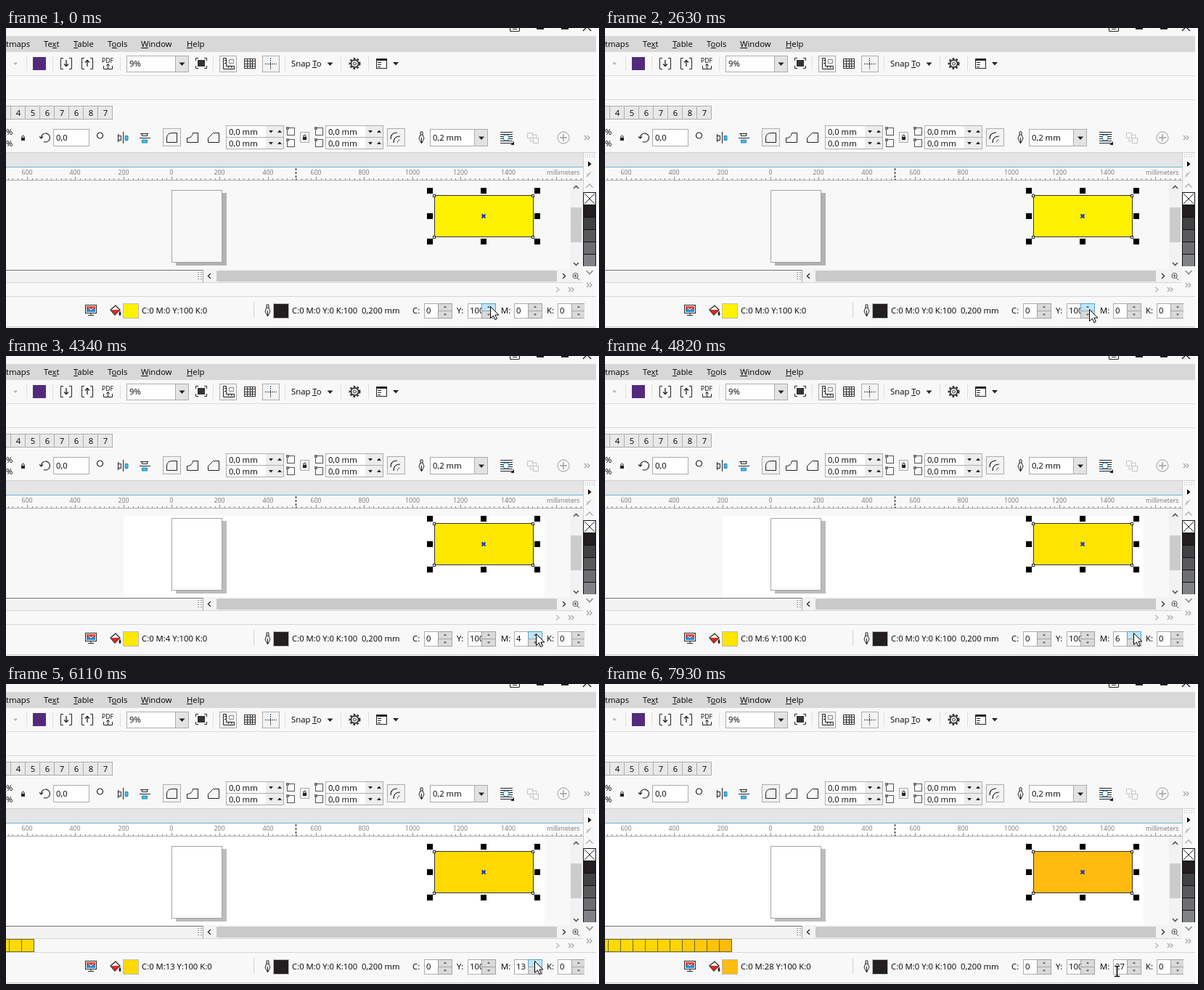
These frames come from a looping animation (817 by 413 pixels, 8000 ms). An HTML page with a canvas:

```html
<!DOCTYPE html>
<html lang="en">
<head>
<meta charset="utf-8">
<title>Colour spinner</title>
<style>
html, body { margin: 0; width: 817px; height: 413px; overflow: hidden; background: #f8f8f8; }
canvas { display: block; }
</style>
</head>
<body>
<canvas id="stage" width="817" height="413"></canvas>
<script>
const g = document.getElementById('stage').getContext('2d');
const INK = '#222', EDGE = '#adadad', DIM = '#b4b4b4', BG = '#f8f8f8', BLUE = '#1883c4';

// time and magenta value set at that time
const clicks = [[0, 0], [3840, 1], [3960, 2], [4100, 3], [4340, 4], [4580, 5], [4820, 6],
  [5060, 7], [5210, 8], [5340, 9], [5480, 10], [5620, 11], [5860, 12], [6110, 13],
  [6250, 14], [6390, 15], [6630, 16], [6780, 17], [7570, 20], [7690, 22], [7810, 25], [7930, 28]];
// time, pointer tip
const moves = [[0, 667, 383], [2630, 667, 387], [2780, 700, 386], [3030, 718, 380],
  [3180, 724, 387], [3330, 725, 387], [3480, 730, 382], [4820, 728, 381], [6900, 713, 381]];
const presses = [870, 990, 1130, 1280, 1530, 1810, 1950, 2070];
const stops = [[0, 255, 242, 0], [4, 255, 232, 0], [9, 255, 222, 0], [17, 255, 212, 0], [28, 255, 187, 14]];

const at = (list, t) => list.filter(e => e[0] <= t).pop();

function tint(m) {
  const i = Math.max(1, stops.findIndex(s => s[0] >= m)), a = stops[i - 1], b = stops[i];
  const k = (m - a[0]) / (b[0] - a[0]);
  return `rgb(${[1, 2, 3].map(c => Math.round(a[c] + (b[c] - a[c]) * k))})`;
}

function box(x, y, w, h, fill, edge) {
  if (edge) { g.fillStyle = edge; g.fillRect(x, y, w, h); x++; y++; w -= 2; h -= 2; }
  g.fillStyle = fill;
  g.fillRect(x, y, w, h);
}

function text(s, x, y, size = 11.3, color = '#000', align = 'left') {
  g.font = size + 'px "Open Sans", "Noto Sans", sans-serif';
  g.textAlign = align;
  g.fillStyle = color;
  g.fillText(s, x, y);
}

function path(d, stroke, fill, width = 1, x = 0, y = 0) {
  const p = new Path2D(d);
  g.save();
  g.translate(x, y);
  if (fill) { g.fillStyle = fill; g.fill(p); }
  if (stroke) { g.strokeStyle = stroke; g.lineWidth = width; g.stroke(p); }
  g.restore();
}

function dashed(d, color, dash) {
  g.setLineDash(dash);
  path(d, color);
  g.setLineDash([]);
}

const ring = (x, y, r, color, width = 1) =>
  path(`M${r} 0A${r} ${r} 0 1 1 ${-r} 0A${r} ${r} 0 1 1 ${r} 0`, color, null, width, x, y);
const down = (x, y, color = INK, s = 4) => path(`M${-s} ${-s / 2}H${s}L0 ${s / 2 + .5}Z`, null, color, 1, x, y);
const up = (x, y, color = INK, s = 4) => path(`M${-s} ${s / 2}H${s}L0 ${-s / 2 - .5}Z`, null, color, 1, x, y);
const more = (x, y) => path('M-4 -3L-1 0L-4 3M0 -3L3 0L0 3', '#a0a0a0', null, 1.2, x, y);

function menu(s, x, y, key) {
  text(s, x, y);
  const left = g.measureText(s.slice(0, key)).width, w = g.measureText(s[key]).width;
  box(Math.round(x + left), y + 1, Math.round(w), 1, '#111');
}

function lock(x, y) {
  box(x - 2, y, 5, 4, INK);
  path('M-1 0V-2Q.5 -4 2 -2V0', INK, null, 1, x, y);
}

function pen(x, y) {
  path('M-1.500 -8H1.500V-4L3.500 1L0 8L-3.500 1L-1.500 -4Z', INK, BG, 1, x, y);
  path('M-1.500 -4H1.500M0 0V7', INK, null, 1, x, y);
}

function menus() {
  path('M694.500 0V4.500H707M707.500 0V4.500M698 1.500H704', INK, '#fff');
  box(731, 0, 10, 2, INK);
  box(765, 0, 10, 2, INK);
  path('M795 4L800 -1M806 4L801 -1', INK, null, 1.4);
  box(0, 11, 813, 22, '#d8d8d8');
  text('tmaps', 0, 26);
  menu('Text', 52, 26, 2);
  menu('Table', 93, 26, 0);
  menu('Tools', 140, 26, 1);
  menu('Window', 186, 26, 0);
  menu('Help', 249, 26, 0);
}

function toolbar() {
  box(0, 65, 813, 1, '#dcdcdc');
  box(0, 98, 813, 1, '#dcdcdc');
  [28, 64, 157, 285, 384, 461, 499].forEach(x => box(x, 39, 1, 20, '#dedede'));
  down(13, 49, DIM, 3);
  box(37, 40, 18, 18, '#53297d');
  for (const [x, arrow] of [[75, 'M8 3V11M5 8.500L8 11.500L11 8.500'], [104, 'M8 12V4M5 6.500L8 3.500L11 6.500']]) {
    path('M4 .5H.5V15.5H4M12 .5H15.500V15.5H12', INK, null, 1, x, 41);
    path(arrow, INK, null, 1.3, x, 41);
  }
  text('PDF', 132, 48, 8.6);
  path('M134.500 52V56.500H146.500V52M140.500 56V50M138 52L140.500 49.500L143 52', INK);
  box(166, 38, 86, 23, '#fff', EDGE);
  box(233, 39, 18, 21, '#e3e3e3');
  box(233, 39, 1, 21, EDGE);
  text('9%', 170, 53);
  down(242.5, 49.5);
  path('M261.5 45V41.5H265M273 41.5H276.5V45M276.5 52V55.5H273M265 55.5H261.5V52', INK);
  box(264, 44, 10, 9, '#333');
  box(294, 38, 24, 23, '#f4f4f4', EDGE);
  path('M299.500 41.500H303.500V52.500H314.500V56.500H299.500ZM301 44.500H303M301 48.500H303M306.500 53V55M310.500 53V55', INK);
  path('M307.500 43.500H313.500V48.500H307.500Z', '#888');
  for (let i = 0; i < 5; i++) {
    box(328 + Math.round(i * 3.75), 42, 1, 14, '#333');
    box(328, 42 + Math.round(i * 3.25), 16, 1, '#333');
  }
  box(353, 38, 24, 23, '#f4f4f4', EDGE);
  dashed('M357 49.500H373M364.500 41V57', '#345', [2, 1]);
  menu('Snap To', 393, 53, 5);
  down(446.5, 49.5);
  g.setLineDash([2.6, 2.4]);
  ring(480.5, 49, 6.8, '#333', 2.4);
  g.setLineDash([]);
  ring(480.5, 49, 5, '#333', 1.8);
  ring(480.5, 49, 2, '#333', 1);
  box(510, 42, 15, 14, '#fff', INK);
  box(510, 42, 15, 3, INK);
  path('M512 47.5H517M512 50.5H517M512 53.5H516', INK);
  down(537, 49);
  box(-5, 107, 12, 19, '#e8e8e8', EDGE);
  [...'4567687'].forEach((s, i) => {
    box(6 + i * 20, 107, 21, 19, '#e8e8e8', EDGE);
    text(s, 17 + i * 20, 121, 11.3, '#000', 'center');
  });
}

function corner(x, y) {
  box(x, y, 11, 11, BG, '#555');
  box(x - 1, y - 1, 4, 4, '#777');
}

function properties() {
  text('%', 0, 147);
  text('%', 0, 163);
  lock(23, 151);
  path('M48.500 151A6 6 0 1 1 52 156.500M46 149.500L48.500 152L51 149.500', INK, null, 1.1);
  box(65, 139, 50, 24, '#fff', EDGE);
  text('0,0', 69, 155);
  ring(129.5, 148, 4, INK, 1.2);
  path('M154.500 146V157M154 148.500H158.500V154.500H154', INK);
  path('M164 148.500H168V154.500H164Z', BLUE, '#5bb7e5');
  box(161, 143, 1, 16, INK);
  path('M185 145.500H196M187.500 145V148.500H194.500V145', INK);
  path('M187.500 154H194.500V158H187.500Z', BLUE, '#5bb7e5');
  box(184, 151, 15, 1, INK);
  box(216, 138, 25, 25, '#f2f2f2', EDGE);
  path('M221.500 157.500V152Q221.500 144.500 229 144.500H235.500V157.500Z', INK);
  path('M249.500 157.500V151.500Q256.500 151.500 257.500 144.500H264.500V157.500Z', INK);
  path('M278.500 157.500V151.500L285.500 144.500H293.500V157.500Z', INK);
  for (const x of [303, 440]) for (const y of [134, 150]) {
    box(x, y, 80, 17, '#fff', EDGE);
    box(x + 55, y + 1, 24, 15, '#ececec');
    text('0,0 mm', x + 4, y + 13);
    down(x + 62, y + 8.5, INK, 3);
    up(x + 74, y + 8.5, INK, 3);
  }
  [387, 426].forEach(x => { corner(x, 137); corner(x, 153); });
  box(405, 143, 13, 15, '#f2f2f2', EDGE);
  lock(411, 150);
  box(525, 138, 25, 25, '#f2f2f2', EDGE);
  path('M530 153Q530 144 539 144M534 158Q534 149 543 149', INK, null, 1.2);
  path('M539 158Q539 154 543 154M530 148L533 145', '#777');
  pen(572.5, 151);
  box(584, 139, 80, 24, '#fff', EDGE);
  box(645, 140, 18, 22, '#e3e3e3');
  box(645, 140, 1, 22, EDGE);
  text('0,2 mm', 588, 155);
  down(655, 151.5);
  for (let y = 143; y < 160; y += 3) box(681, y, 17, 1, INK);
  path('M685 151A4 4 0 1 1 693 151A4 4 0 1 1 685 151', BLUE, '#fff', 1.2);
  path('M695 161H700V156Z', null, INK);
  path('M718.500 144.500H725.500V151.500H718.500ZM726.500 151.500H733.500V158.500H726.500ZM722 152V156H726M726 147H731V151', '#c2c2c2');
  ring(768, 151, 8, DIM, 1.3);
  path('M763 151H773M768 146V156', DIM, null, 2);
  more(801, 151);
}

function ruler() {
  box(0, 171, 795, 21, '#e5e5e5');
  box(0, 171, 813, 1, '#d0d0d0');
  box(0, 191, 795, 1, '#6bb8d8');
  for (let i = -34; i < 86; i++) {
    const x = Math.round(228 + i * 6.63), major = i % 10 == 0;
    if (x < 795) box(x, major ? 205 : 207, 1, major ? 4 : 2, '#888');
    if (major && i >= -30 && i <= 70) text(Math.abs(i * 20), x, 202, 8.8, '#777', 'center');
  }
  box(0, 209, 795, 1, '#aaa');
  text('millimeters', 745, 202, 8.7, '#777');
  dashed('M399.500 193V209', '#000', [3, 2]);
}

function drawing(fill, fresh) {
  box(234, 227, 70, 100, fresh ? '#bcbcbc' : '#b2b2b2');
  box(228, 223, 70, 100, fresh ? '#fff' : BG, '#a4a4a4');
  box(590, 230, 137, 58, fill, '#333');
  for (const x of [590, 726]) for (const y of [230, 287]) box(x - 2, y - 1, 4, 4, '#fff', '#223');
  for (const x of [580, 654, 728]) for (const y of [220, 255, 290])
    if (x != 654 || y != 255) box(x, y, 8, 8, '#000');
  path('M655.500 256.500L660.500 261.500M660.500 256.500L655.500 261.500', '#1030d8', null, 2);
}

function scrollbars() {
  box(777, 210, 17, 122, '#f2f2f2');
  path('M782 221L785.500 217.500L789 221M782 323L785.500 326.500L789 323', '#555', null, 1.6);
  box(778, 247, 15, 48, '#cbcbcb');
  box(0, 332, 795, 18, '#f3f3f3');
  box(0, 333, 272, 1, '#777');
  box(271, 333, 1, 17, '#aaa');
  for (let y = 336; y < 348; y += 3) { box(264, y, 2, 1, '#999'); box(268, y, 2, 1, '#999'); }
  path('M282 338L278.500 341.500L282 345M767 338L770.500 341.500L767 345', '#444', null, 1.6);
  box(290, 334, 469, 15, '#c9c9c9');
  ring(784.5, 341, 3.6, '#555');
  path('M787 344L790 347M782.500 341H786.500M784.500 339V343', '#555');
  box(0, 350, 795, 1, '#d5d5d5');
  box(0, 369, 813, 1, '#d5d5d5');
  path('M758 356.500L762 360L758 363.500', DIM, null, 1.2);
  more(779, 360);
}

function palette() {
  box(795, 171, 1, 198, '#ccc');
  for (let x = 798; x < 811; x += 3) for (let y = 174; y < 180; y += 3) box(x, y, 1, 1, '#aaa');
  path('M802 183.500V191L806.500 187.200Z', null, '#000');
  path('M800 205L806 198M800 205L802 200', '#bbb', null, 1.5);
  path('M799.500 219.500L804 215L808.500 219.500', DIM, null, 1.6);
  box(795, 226, 18, 103, '#111');
  ['#fff', '#231f20', '#414042', '#58595b', '#6d6e71', '#808285'].forEach((c, i) => box(796, 227 + i * 17, 16, 16, c));
  path('M797 228L811 242M811 228L797 242', '#222');
  box(795, 328, 18, 41, BG);
  path('M799.500 334L804 338.500L808.500 334', '#888', null, 1.6);
  more(804, 354);
}

function spinner(label, value, x, lx, hot) {
  text(label, lx, 393);
  box(x, 379, 39, 21, '#fff', EDGE);
  text(value, x + 3, 393);
  box(x + 19, 379, 20, 11, hot || '#dadada', hot ? '#57a5c8' : '#a2a2a2');
  box(x + 19, 389, 20, 11, '#dadada', '#a2a2a2');
  up(x + 29, 384, '#555', 2);
  down(x + 29, 394.5, '#555', 2);
}

function status(m, t) {
  box(109, 381, 16, 12, BG, INK);
  box(111, 383, 12, 4, '#e53b32');
  box(111, 387, 12, 4, '#2a8fd0');
  path('M114 385L117 388L120 385', '#fff');
  path('M113 395.500H121M117 393V396', INK);
  path('M144 388L151 382L157 388L150 395Z', INK, BG, 1.2);
  path('M145 388H157L150 395Z', null, '#d9281e');
  path('M157 389Q160 395 157 396Q154 395 157 389', null, INK);
  box(161, 379, 22, 21, tint(m), '#bbb');
  text(`C:0 M:${m} Y:100 K:0`, 187, 393);
  box(341, 378, 1, 21, '#d0d0d0');
  pen(360.5, 389);
  box(368, 379, 22, 21, '#231f20', '#bbb');
  text('C:0 M:0 Y:0 K:100', 394, 393);
  text('0,200 mm', 490, 393);
  const pressed = presses.filter(p => p <= t).length % 2;
  spinner('C:', 0, 576, 560);
  spinner('Y:', 100, 636, 621, t < 2780 && (pressed ? '#98d1ef' : '#bee6fd'));
  spinner('M:', m == 28 ? 27 : m, 700, 682, t >= 3180 && t < 6900 && '#bee6fd');
  spinner('K:', 0, 760, 745);
  box(797, 372, 16, 38, BG);
  box(0, 411, 813, 1, '#c4c4c4');
}

function pointer(t) {
  if (t >= 7450) {
    const beam = 'M702 388.500H704.500L705.500 389.500L706.500 388.500H709M705.500 389V402M702 402.500H704.500L705.500 401.500L706.500 402.500H709';
    path(beam, '#fff', null, 3);
    path(beam, '#000', null, 1.6);
    return;
  }
  const [, x, y] = at(moves, t);
  path('M.5 .5V16.500L4.300 13L6.800 18.500L9.300 17.400L6.900 12H11.800Z', '#000', '#fff', 1, x, y);
}

function draw(t) {
  const m = at(clicks, t)[1];
  box(0, 0, 817, 413, BG);
  menus();
  toolbar();
  properties();
  if (t >= 5620) box(0, 193, 742, 140, '#fff');
  else if (m) box(162, 220, 580, 113, '#fff');
  ruler();
  drawing(tint(m), m > 0);
  scrollbars();
  clicks.filter(c => c[1] > 10 && c[0] <= t).forEach((c, i) =>
    box(i * 17 - 13, 351, 18, 18, tint(c[1]), '#6e6630'));
  palette();
  status(m, t);
  box(813, 0, 4, 413, '#fdfdfd');
  pointer(t);
}

const start = performance.now();
function tick() {
  draw((performance.now() - start) % 8000);
  requestAnimationFrame(tick);
}
tick();
</script>
</body>
</html>
```
